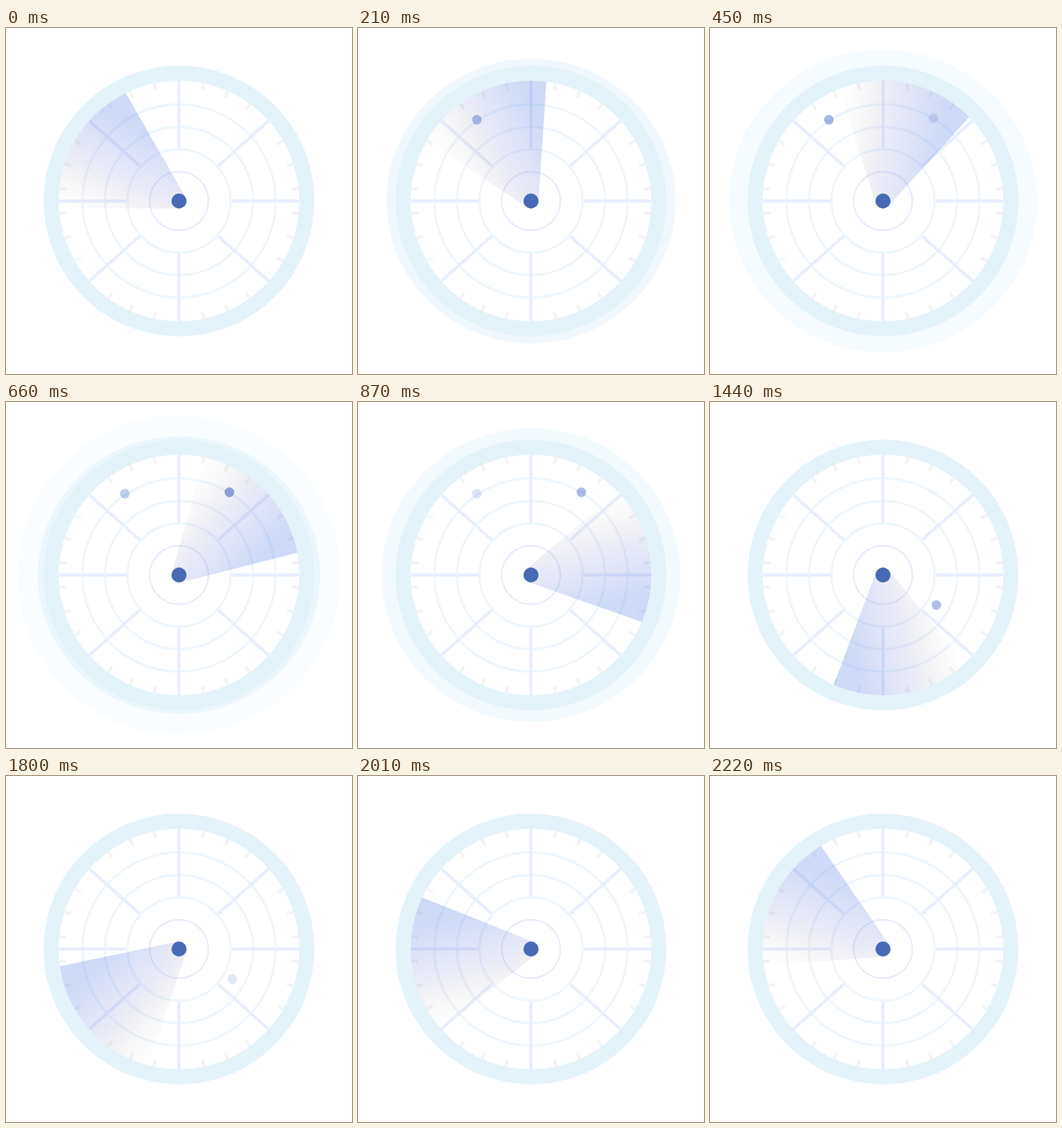
Animation, 460 px wide and 460 px high, one loop 2250 ms. Source, as an HTML page with a canvas:

```html
<!DOCTYPE html>
<html lang="en">
<head>
<meta charset="utf-8">
<title>Radar</title>
<style>
  html, body { margin: 0; width: 100%; height: 100%; overflow: hidden; background: #fff; }
  canvas { display: block; }
</style>
</head>
<body>
<canvas id="stage" width="460" height="460"></canvas>
<script>
const ctx = document.getElementById('stage').getContext('2d');
const LOOP = 2250, TAU = Math.PI * 2, DEG = Math.PI / 180;
const waveStarts = [30, 570];
const blips = [
  { x: -72, y: -108, start: 0 },
  { x: 67, y: -110, start: 365 },
  { x: 71, y: 40, start: 905 }
];

function disc(x, y, rx, ry, color) {
  ctx.fillStyle = color;
  ctx.beginPath();
  ctx.ellipse(x, y, rx, ry, 0, 0, TAU);
  ctx.fill();
}

function ring(r, width, color) {
  ctx.strokeStyle = color;
  ctx.lineWidth = width;
  ctx.beginPath();
  ctx.arc(0, 0, r, 0, TAU);
  ctx.stroke();
}

// Radial line; the angle runs clockwise from the top.
function ray(angle, from, to, color) {
  const x = Math.sin(angle * DEG), y = -Math.cos(angle * DEG);
  ctx.strokeStyle = color;
  ctx.lineWidth = 4;
  ctx.beginPath();
  ctx.moveTo(x * from, y * from);
  ctx.lineTo(x * to, y * to);
  ctx.stroke();
}

const beamFill = ctx.createLinearGradient(-32, 68, 28, -60);
beamFill.addColorStop(0, 'rgba(130,115,115,0)');
beamFill.addColorStop(0.22, 'rgba(130,120,135,0.05)');
beamFill.addColorStop(0.53, 'rgba(100,110,200,0.15)');
beamFill.addColorStop(1, 'rgba(74,118,224,0.27)');

function drawWaves(time) {
  for (const start of waveStarts) {
    const age = time - start;
    if (age < 0 || age > 850) continue;
    const scale = 1 + age * 0.0002815;
    ctx.globalAlpha = 0.7 * (1 - age / 850);
    disc(0, 0, 183 * scale, 180 * scale, '#e3f3fb');
  }
  ctx.globalAlpha = 1;
}

function drawGrid() {
  for (let a = 12; a < 360; a += 12) {
    if (a % 180 && ![48, 132, 228, 312].includes(a)) ray(a, 151, 160, '#f4f3f3');
  }
  for (const r of [68.5, 98.5, 128.5]) ring(r, 3, '#edf6fd');
  ring(39, 2, '#e7ebfb');
  for (const a of [0, 90, 180, 270, 48.2, 131.8, 228.2, 311.8]) {
    ray(a, 70, 161, '#e9eefe');
  }
}

function drawBlips(time) {
  for (const { x, y, start } of blips) {
    const age = time - start;
    if (age < 0 || age > 1100) continue;
    ctx.globalAlpha = 0.62 * Math.min(age / 300, (1100 - age) / 800);
    disc(x, y, 6.4, 6.4, '#4a6cc8');
  }
  ctx.globalAlpha = 1;
}

function drawBeam(time) {
  ctx.save();
  ctx.beginPath();
  ctx.arc(0, 0, 161, 0, TAU);
  ctx.clip();
  ctx.rotate(time / LOOP * TAU);
  ctx.beginPath();
  ctx.arc(0, 0, 10, -30 * DEG, 90 * DEG);
  ctx.lineTo(-200, 10);
  ctx.lineTo(-91.3, -178.2);
  ctx.closePath();
  ctx.fillStyle = beamFill;
  ctx.fill();
  ctx.restore();
}

function draw() {
  const time = performance.now() % LOOP;
  ctx.setTransform(1, 0, 0, 1, 0, 0);
  ctx.clearRect(0, 0, 460, 460);
  ctx.translate(230, 230);
  drawWaves(time);
  disc(0, 0, 179, 179, '#fff');
  drawGrid();
  drawBlips(time);
  drawBeam(time);
  ring(170, 20, '#e4f2fa');
  disc(0, 0, 10, 10, '#4869b4');
  requestAnimationFrame(draw);
}
draw();
</script>
</body>
</html>
```
